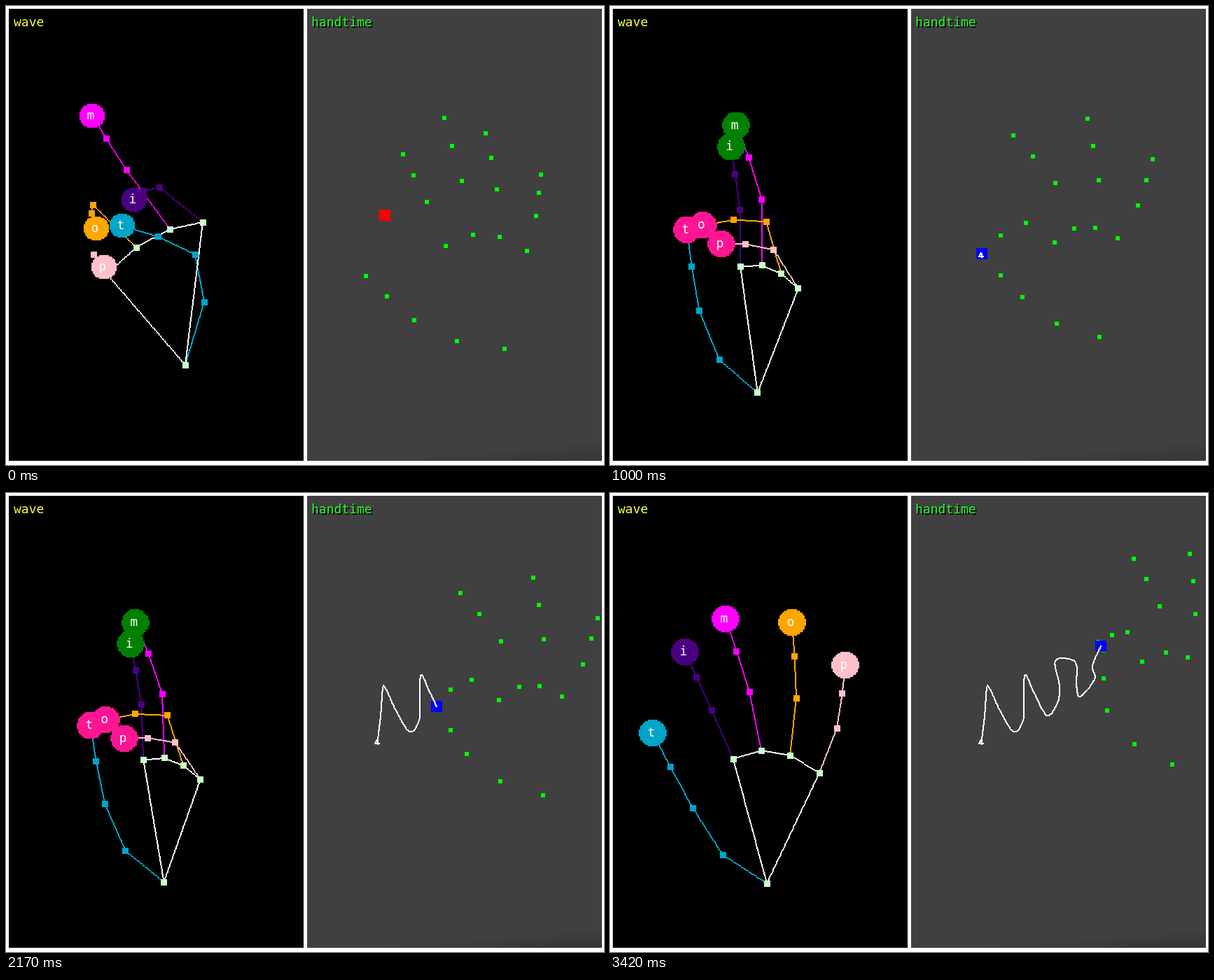
Recreate the animation shown at these times as an HTML page with a canvas. Size 854x656 px, loop 3500 ms.

```html
<!DOCTYPE html>
<html lang="en">
<head>
<meta charset="utf-8">
<title>handtime</title>
<style>
  html, body { margin: 0; width: 100%; height: 100%; overflow: hidden; background: #fff; }
  canvas { display: block; }
</style>
</head>
<body>
<canvas id="stage" width="854" height="656"></canvas>
<script>
const ctx = document.getElementById('stage').getContext('2d');
const LOOP = 3500, CELL = 1.8;
const FONT = '18px "DejaVu Sans Mono", "Noto Sans Mono", monospace';
const LETTERS = 'timop';
const COLORS = ['#00a5c8', '#4b0082', '#ff00ff', '#ffa500', '#ffc0cb'];

const mix = (a, b, u) => a + (b - a) * u;
const mixPt = (p, q, u) => [mix(p[0], q[0], u), mix(p[1], q[1], u)];
const add = (p, q, k = 1) => [p[0] + q[0] * k, p[1] + q[1] * k];
const sub = (p, q) => add(p, q, -1);

// A shape holds five fingers, thumb first: base, middle joint and tip, seen from the wrist.
const shape = (...v) => Array.from({ length: 5 }, (_, f) =>
  [0, 2, 4].map(j => v.slice(6 * f + j, 6 * f + j + 2)));

const fist = shape(
  27,-90, 14,-158, -90,-199,
  25,-204, -37,-254, -73,-236,
  -22,-194, -84,-279, -133,-356,
  -70,-168, -132,-229, -127,-195,
  -112,-130, -131,-158, -116,-140);
const open = shape(
  -63,-41, -106,-108, -163,-215,
  -48,-178, -79,-248, -117,-331,
  -8,-190, -25,-274, -59,-378,
  33,-183, 42,-265, 36,-373,
  75,-158, 100,-222, 112,-312);
const pinch = shape(
  -54,-45, -83,-113, -102,-225,
  -27,-175, -29,-254, -43,-341,
  3,-177, 1,-269, -36,-371,
  30,-166, 8,-238, -80,-227,
  54,-146, 19,-199, -54,-206);
const spread = shape(
  -68,-11, -129,-41, -198,-104,
  -84,-147, -111,-210, -145,-278,
  -45,-163, -61,-240, -86,-330,
  -7,-160, -11,-228, -27,-308,
  32,-140, 45,-190, 52,-249);
const hook = shape(
  -61,-19, -110,-57, -160,-127,
  -64,-135, -105,-163, -167,-137,
  -36,-155, -63,-220, -123,-288,
  -6,-156, -1,-224, -17,-312,
  26,-141, 55,-188, 76,-254);
const turned = shape(
  -54,-29, -93,-77, -99,-162,
  -43,-147, -64,-189, -107,-175,
  -9,-160, -18,-226, -55,-294,
  22,-153, 33,-215, 25,-301,
  55,-138, 87,-183, 119,-248);

const leftShapes = [[0, fist], [4, open], [7, open], [9, pinch], [30, pinch], [36, open], [41, open]];
const rightShapes = [[0, spread], [8, hook], [25, hook], [41, turned]];

// step, wrist x, wrist y, scale, tilt, lift of the ring fingertip
const leftMoves = [
  [0, 256, 513, 1, 0, 0],
  [4, 205, 553, 1.05, 0, 0],
  [9, 204, 552, 1.05, 0.01, -8],
  [16, 220, 554, 1, 0.026, 0],
  [22, 224, 556, 1, 0, -12],
  [30, 227, 556, 1, -0.026, 0],
  [36, 225, 558, 1, 0, 0],
  [41, 224, 558, 1, 0, 0]
];
const rightMoves = [
  [0, 712, 490], [9, 700, 483], [16, 705, 418], [22, 753, 425],
  [30, 782, 414], [35, 793, 414], [41, 803, 388]
];

// step, x, y along the pen stroke
const penKeys = [
  [8, 527, 358], [8.3, 530, 353], [8.6, 528, 358], [9, 533, 358], [12, 531, 354],
  [14, 535, 318], [15.6, 538, 280], [16, 542, 279], [18, 557, 311], [19.5, 576, 341],
  [21, 590, 325], [22, 591, 291], [23.5, 593, 260], [25, 606, 286], [27, 624, 318],
  [29, 639, 300], [30, 642, 276], [31.5, 636, 240], [33, 659, 238], [34, 667, 250],
  [35, 666, 271], [36.5, 671, 291], [39, 692, 266], [40, 689, 247], [41, 701, 219]
];

function between(track, step) {
  const i = Math.max(1, track.findIndex(k => k[0] >= step));
  const a = track[i - 1], b = track[i];
  return { i, a, b, u: (step - a[0]) / (b[0] - a[0]) };
}

function valuesAt(track, step) {
  const { a, b, u } = between(track, step);
  return a.slice(1).map((v, i) => mix(v, b[i + 1], u));
}

function swing(p, q, u) {
  const turn = mix(Math.atan2(p[0], -p[1]), Math.atan2(q[0], -q[1]), u);
  const len = mix(Math.hypot(...p), Math.hypot(...q), u);
  return [len * Math.sin(turn), -len * Math.cos(turn)];
}

// Fingers swing about their bases; the little finger comes last.
function shapeAt(track, step) {
  const { a, b, u } = between(track, step);
  return a[1].map((from, f) => {
    const to = b[1][f], w = Math.min(1, u * (1 + 0.12 * (4 - f)));
    const base = mixPt(from[0], to[0], w);
    return [base, ...[1, 2].map(j =>
      add(base, swing(sub(from[j], from[0]), sub(to[j], to[0]), w)))];
  });
}

function place(fingers, wrist, scale = 1, tilt = 0) {
  const c = Math.cos(tilt) * scale, s = Math.sin(tilt) * scale;
  return fingers.map(f => f.map(([x, y]) => add(wrist, [x * c - y * s, x * s + y * c])));
}

// The last knuckle lies halfway to the tip, bulging along the finger.
const fullFinger = ([base, joint, tip]) =>
  [base, joint, add(mixPt(joint, tip, 0.5), sub(joint, base), 0.07), tip];

function penAt(step) {
  const { i, b, a, u } = between(penKeys, step);
  const before = penKeys[i - 2] || a, after = penKeys[i + 1] || b;
  return [1, 2].map(n => a[n] + 0.5 * u * (b[n] - before[n] +
    u * (2 * before[n] - 5 * a[n] + 4 * b[n] - after[n] +
    u * (3 * (a[n] - b[n]) + after[n] - before[n]))));
}

function box([x, y], size, color) {
  ctx.fillStyle = color;
  ctx.fillRect(Math.round(x - size / 2), Math.round(y - size / 2), size, size);
}

function line(p, q, color) {
  const n = Math.ceil(Math.max(Math.abs(q[0] - p[0]), Math.abs(q[1] - p[1])) / CELL) || 1;
  for (let i = 0; i <= n; i++) box(mixPt(p, q, i / n), 2, color);
}

function path(pts, color) {
  for (let i = 1; i < pts.length; i++) line(pts[i - 1], pts[i], color);
}

function disc([x, y], r, color) {
  ctx.fillStyle = color;
  const rows = Math.round(r / CELL);
  for (let i = -rows; i <= rows; i++) {
    const w = Math.round(Math.sqrt(Math.max(0, r * r - (i * CELL) ** 2)) / CELL) * CELL;
    ctx.fillRect(Math.round(x - w), Math.round(y + i * CELL - 1), Math.round(2 * w), 2);
  }
}

function text(s, x, y, color, align = 'left') {
  ctx.font = FONT;
  ctx.textAlign = align;
  ctx.fillStyle = color;
  ctx.fillText(s, x, y);
}

// Touching fingertips share a colour.
function tipColors(tips, r) {
  const touch = (a, b) => Math.hypot(...sub(tips[a], tips[b])) < 2 * r;
  const c = COLORS.slice();
  if (touch(1, 2)) c[1] = c[2] = '#008000';
  if (touch(0, 3)) {
    c[0] = c[3] = '#ffd700';
    if (touch(3, 4)) c[0] = c[3] = c[4] = '#ff1493';
  }
  return c;
}

function drawHand(step) {
  const [x, y, scale, tilt, lift] = valuesAt(leftMoves, step);
  const wrist = [x, y];
  const bones = place(shapeAt(leftShapes, step), wrist, scale, tilt);
  bones[3][2][1] += lift;
  const fingers = bones.map(fullFinger);
  const knuckles = fingers.slice(1).map(f => f[0]);
  const tips = fingers.map(f => f[3]);
  const r = Math.min(19.6, 18 + step * 0.4);
  const colors = tipColors(tips, r);

  fingers.forEach((f, i) => path(i ? f : [wrist, ...f], COLORS[i]));
  path([wrist, ...knuckles, wrist], '#fff');
  fingers.forEach((f, i) => f.slice(i ? 1 : 0, 3).forEach(p => box(p, 9, COLORS[i])));
  [wrist, ...knuckles].forEach(p => box(p, 9, '#c8ffc8'));
  tips.forEach((p, i) => {
    disc(p, r, colors[i]);
    text(LETTERS[i], p[0] - 2, p[1] + 5, '#fff', 'center');
  });
}

function drawPen(step) {
  const down = step >= 9;
  let wrist = valuesAt(rightMoves, step);
  if (down) {
    const { a, b, u } = between(rightMoves, step);
    const chord = mixPt(penAt(Math.max(9, a[0])), penAt(b[0]), u);
    wrist = add(wrist, sub(penAt(step), chord), 0.6);
  }
  const bones = place(shapeAt(rightShapes, step), wrist);
  const grip = mixPt(bones[0][2], bones[1][2], 0.5);
  const pen = down ? penAt(step) : grip;
  for (const f of [0, 1]) bones[f][2] = add(bones[f][2], sub(pen, grip));

  [wrist, ...bones.flatMap(fullFinger)].forEach(p => box(p, 6, '#00ff00'));
  box(pen, 16, step < 8 ? '#ff0000' : '#0000ff');
  const stroke = [];
  for (let s = 8; s <= step; s += 0.1) stroke.push(penAt(s));
  if (down) stroke.push(pen);
  path(stroke, '#fff');
}

function panel(x, color, draw) {
  ctx.save();
  ctx.beginPath();
  ctx.rect(x, 4, 421, 646);
  ctx.clip();
  ctx.fillStyle = color;
  ctx.fillRect(x, 4, 421, 646);
  draw();
  ctx.restore();
}

function shade() {
  const g = ctx.createLinearGradient(700, 634, 702, 656);
  g.addColorStop(0, '#404040');
  g.addColorStop(1, '#383838');
  ctx.fillStyle = g;
  ctx.fillRect(430, 600, 421, 50);
}

function render(now) {
  const t = now % LOOP, r = t % 250;
  const step = 3 * Math.floor(t / 250) + (r >= 80) + (r >= 170);
  ctx.fillStyle = '#fff';
  ctx.fillRect(0, 0, 854, 656);
  panel(4, '#000', () => {
    drawHand(step);
    text('wave', 11, 29, '#ffff40');
  });
  panel(430, '#404040', () => {
    shade();
    drawPen(step);
    text('handtime', 438, 31, '#000');
    text('handtime', 436, 29, '#20ff20');
  });
}

const start = performance.now();
function tick() {
  render(performance.now() - start);
  requestAnimationFrame(tick);
}
tick();
</script>
</body>
</html>
```
